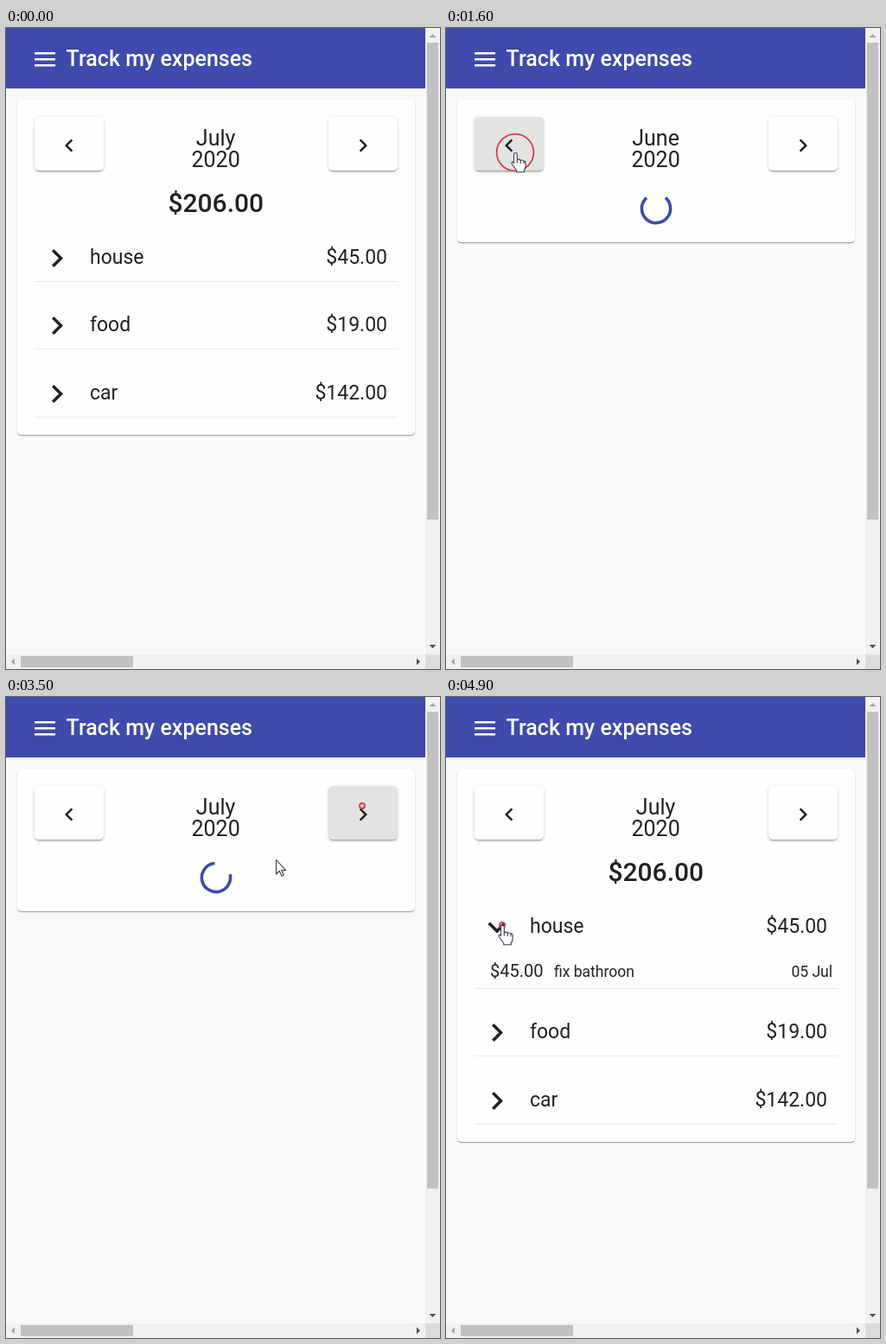
An HTML page for the animation above (5 s loop, 502 by 742 pixels).

```html
<!DOCTYPE html>
<html lang="en">
<head>
<meta charset="utf-8">
<title>Expenses</title>
<style>
  html, body { margin: 0; width: 100%; height: 100%; overflow: hidden; }
  #stage { position: relative; width: 502px; height: 742px; overflow: hidden; background: #f8faf7; }
  #stage > * { position: absolute; }
  header { left: 0; top: 0; width: 485px; height: 70px; background: #3f4aac; }
  .card { left: 13px; top: 83px; width: 460px; border-radius: 5px; background: #fdfffc;
    box-shadow: 0 2px 1px -1px #0003, 0 1px 1px #00000024, 0 1px 3px #0000001f; }
  .button { top: 103px; width: 80px; height: 62px; border-radius: 5px; background: #fdfffc;
    box-shadow: 0 3px 1px -2px #0003, 0 2px 2px #00000024, 0 1px 5px #0000001f; }
  svg { left: 0; top: 0; }
  text { font-family: Roboto, Arial, sans-serif; fill: #212121; font-size: 23px; }
  .medium { font-weight: 500; }
  .mid { text-anchor: middle; }
  .end { text-anchor: end; }
</style>
</head>
<body>
<div id="stage">
  <header></header>
  <div class="card" id="card"></div>
  <div class="button" id="prev" style="left:33px"></div>
  <div class="button" id="next" style="left:373px"></div>
  <svg width="502" height="742" viewBox="0 0 502 742">
    <path d="M33 29.2h24M33 36.2h24M33 43.2h24" stroke="#fff" stroke-width="2.6"/>
    <text class="medium" x="69.5" y="44" style="font-size:25px;fill:#fff">Track my expenses</text>
    <g fill="#212121">
      <path d="M15.41 7.41L14 6l-6 6 6 6 1.41-1.41L10.83 12z" transform="translate(58 121) scale(1.25)"/>
      <path d="M10 6L8.59 7.41 13.17 12l-4.58 4.59L10 18l6-6z" transform="translate(398 121) scale(1.25)"/>
    </g>
    <text class="mid" id="month" x="242.6" y="136" style="font-size:25px"></text>
    <text class="mid" x="242.6" y="161" style="font-size:25px">2020</text>
    <g id="content"></g>
    <circle id="spinner" cx="243" cy="209" r="16.6" fill="none" stroke="#3f4aac" stroke-width="3.6"
      pathLength="360" stroke-dasharray="278 82"/>
    <g id="scrollbars">
      <path d="M485 0h17v725h-17zM0 725h485v17H0z" fill="#f1f1f1"/>
      <path d="M485 725h17v17h-17z" fill="#dcdcdc"/>
      <path d="M487 17h13v552h-13zM17 727h130v13H17z" fill="#c1c1c1"/>
      <path d="M489.5 11l4-4 4 4zM10 729.5l-4 4 4 4z" fill="#a3a3a3"/>
      <path d="M489.5 714l4 4 4-4zM475 729.5l4 4-4 4z" fill="#505050"/>
    </g>
    <circle id="ring" fill="none" stroke="#dd3a50" stroke-width="1.8"/>
    <path id="cursor" fill="#fff" stroke="#3b3b4b" stroke-width="1.1" stroke-linejoin="round"/>
  </svg>
</div>
<script>
const LOOP = 5000, STEP = 100;
const $ = id => document.getElementById(id);

const JULY = { month: 'July', total: '$206.00', rows: [['house', '$45.00'], ['food', '$19.00'], ['car', '$142.00']] };
const JUNE = { month: 'June', total: '$210.00', rows: [['food', '$110.00'], ['car', '$100.00']] };

// start time, data, loading, first row open
const SCENES = [
  [0, JULY], [1600, JUNE, true], [2100, JUNE], [3400, JULY, true], [3800, JULY], [4500, JULY, false, true]
];
// time, x, y
const CLICKS = [[1500, 80, 144], [3000, 412, 126], [4400, 65, 264]];
const PATH = [
  [100, 270, 393], [600, 89, 192], [1000, 80, 144], [1800, 80, 144], [2300, 411, 130], [2400, 413, 128],
  [2999, 413, 128], [3000, 412, 126], [3300, 412, 126], [3500, 312, 188], [4000, 72, 264], [4100, 65, 264], [LOOP, 65, 264]
];
const ARROW = 'M.5 .5v16.5l3.8-3.6 2.6 5.8 2.3-1-2.5-5.6h5z';
const HAND = 'M-1.5 2.5q0-2 1.9-2t1.9 2v6q3-1 4 .6q3-.6 3.6 1q2.2-.2 2.2 2v4q0 3-1.8 4.5v2.2h-8.6v-1.8l-5.4-7.5q-.8-2.2 1-2.4t1.2 1.6z'
  + 'M2.3 8.5v4M6.3 9.6v3.4M9.9 10.4v3';

const clamp = v => Math.max(0, Math.min(1, v));
const set = (el, attrs) => { for (const k in attrs) el.setAttribute(k, attrs[k]); };
const label = (x, y, text, cls = '', size = 23) =>
  `<text x="${x}" y="${y}" class="${cls}" style="font-size:${size}px">${text}</text>`;

function rowMarkup([name, amount], i, open) {
  const shift = open && i ? 44 : 0;
  const y = Math.round(i * 78.5 - 0.2) + shift;
  const opened = open && !i;
  const turn = opened ? 'rotate(90)' : '';
  return `<path fill="#212121" transform="translate(59 ${y + 266.5}) ${turn} scale(1.75) translate(-12 -12)"
      d="M10 6L8.59 7.41 13.17 12l-4.58 4.59L10 18l6-6z"/>`
    + label(97, y + 273, name) + label(441, y + 273, amount, 'end')
    + (opened ? label(51, 324, '$45.00', '', 20) + label(125, 324, 'fix bathroon', '', 17.5)
      + label(447, 324, '05 Jul', 'end', 17.5) : '')
    + `<rect x="33" y="${y + 293 + (opened ? 44 : 0)}" width="420" height="1" fill="#e9ebe8"/>`;
}

let shown;
function showScene(scene) {
  if (scene === shown) return;
  shown = scene;
  const [, data, loading, open] = scene;
  $('month').textContent = data.month;
  $('content').innerHTML = loading ? '' :
    label(242.8, 213, data.total, 'mid medium', 30) + data.rows.map((row, i) => rowMarkup(row, i, open)).join('');
  const bottom = loading ? 248 : 393 + (data.rows.length - 2) * 78 + (open ? 44 : 0);
  $('card').style.height = bottom - 83 + 'px';
  $('spinner').style.display = loading ? '' : 'none';
}

function cursorAt(t) {
  const i = Math.max(1, PATH.findIndex(p => p[0] > t));
  const [t0, x0, y0] = PATH[i - 1], [t1, x1, y1] = PATH[i];
  const k = clamp((t - t0) / (t1 - t0));
  return [x0 + (x1 - x0) * k, y0 + (y1 - y0) * k];
}

function isClickable(x, y) {
  const inButton = left => x > left && x < left + 80 && y > 103 && y < 165;
  return inButton(33) || inButton(373) || (x < 85 && y > 245 && y < 290);
}

function press(el, since) {
  const k = Math.min(clamp(since / 100), clamp((800 - since) / 300));
  const dim = c => Math.round(c * (1 - 0.105 * k));
  el.style.background = `rgb(${dim(253)},${dim(255)},${dim(252)})`;
}

function render(time) {
  const t = Math.floor(time % LOOP / STEP) * STEP;
  const scene = SCENES.filter(s => s[0] <= t).pop();
  showScene(scene);
  set($('spinner'), { transform: `rotate(${-49 + (t - scene[0]) * 0.36} 243 209)` });
  // the dash begins at three o'clock, so the quarter gap faces up at rest

  press($('prev'), t - CLICKS[0][0]);
  press($('next'), t - CLICKS[1][0]);

  const click = CLICKS.filter(c => c[0] <= t).pop();
  const radius = click ? 26 - (t - click[0]) * 0.046 : 0;
  $('ring').style.display = radius > 0 ? '' : 'none';
  if (radius > 0) set($('ring'), { cx: click[1], cy: click[2], r: radius });

  const [x, y] = cursorAt(t);
  $('cursor').style.display = t < 100 ? 'none' : '';
  set($('cursor'), { d: isClickable(x, y) ? HAND : ARROW, transform: `translate(${x.toFixed(1)} ${y.toFixed(1)})` });
}

const start = performance.now();
function frame() {
  render(performance.now() - start);
  requestAnimationFrame(frame);
}
render(0);
requestAnimationFrame(frame);
</script>
</body>
</html>
```
